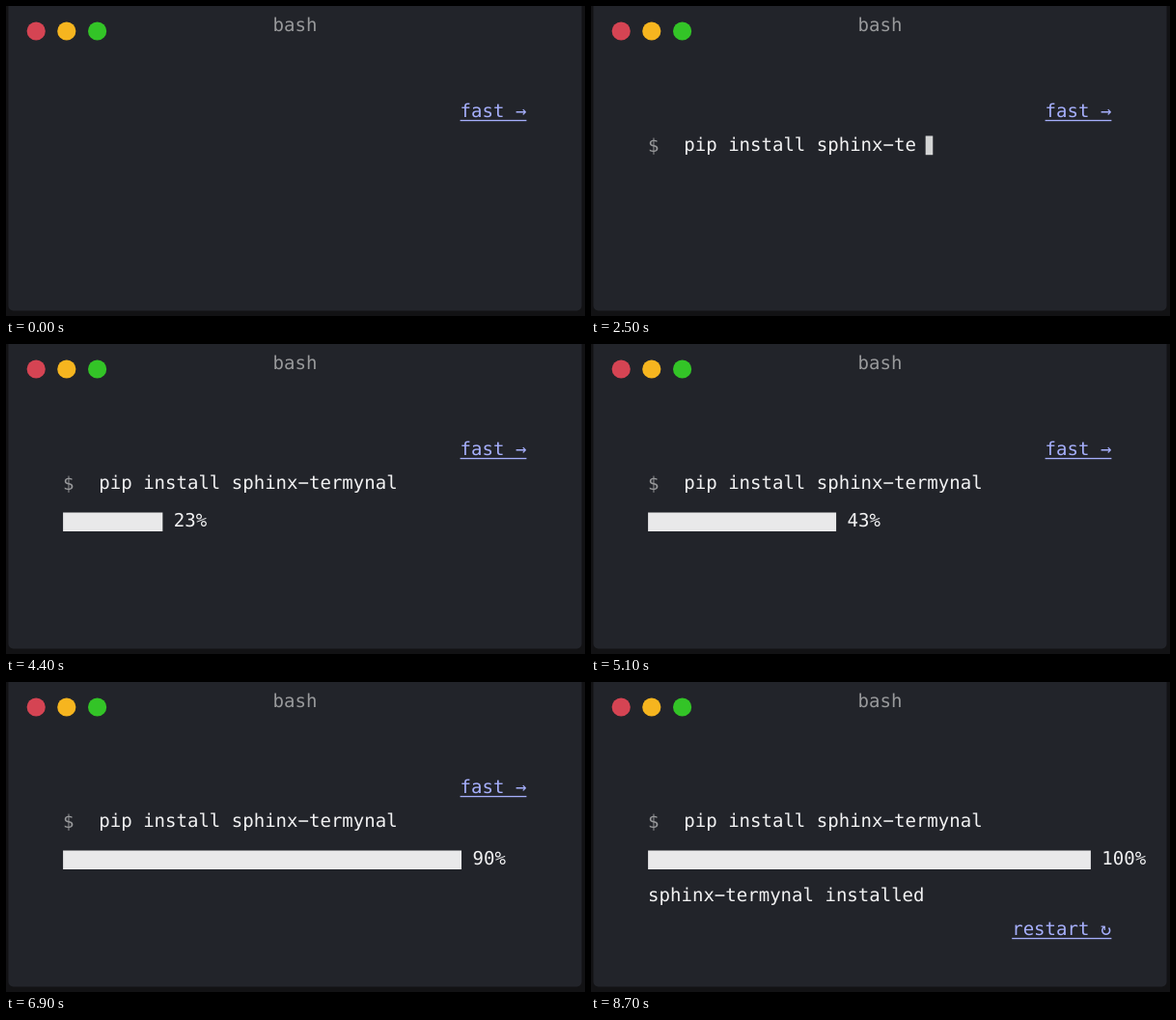
Animation, 600 px wide and 321 px high, one loop 8.8 s. Source, as an HTML page:

```html
<!DOCTYPE html>
<html lang="en">
<head>
<meta charset="utf-8">
<title>Terminal</title>
<style>
  html, body { margin: 0; width: 100%; height: 100%; overflow: hidden; background: #121214; }
  svg { display: block; width: 100%; height: 100%; }
  text {
    font: 19.05px "DejaVu Sans Mono", "Liberation Mono", monospace;
    fill: #f1f1f2;
    white-space: pre;
    text-rendering: geometricPrecision;
  }
  .muted { fill: #98999b; }
  .link text, .link rect { fill: #a6affc; }
</style>
</head>
<body>
<svg viewBox="0 0 600 321">
  <rect width="600" height="321" fill="#121214"/>
  <rect x="2.5" y="-8" width="594" height="323.5" rx="5" fill="#22242a"/>
  <circle cx="31.2" cy="26" r="9.6" fill="#d54453"/>
  <circle cx="62.8" cy="26" r="9.6" fill="#f6b51f"/>
  <circle cx="94.6" cy="26" r="9.6" fill="#33c427"/>
  <text class="muted" x="299.5" y="26" text-anchor="middle">bash</text>

  <g id="fast" class="link">
    <text x="470.6" y="115">fast →</text>
    <rect x="470.6" y="117.9" width="68.8" height="1.3"/>
  </g>
  <g id="prompt">
    <text class="muted" x="59.1" y="151">$</text>
    <text id="command" x="96.3" y="150"></text>
    <rect id="cursor" y="134.5" width="7.6" height="19.7" fill="#eeeeee"/>
  </g>
  <rect id="bar" x="59.1" y="174.5" height="19.5" fill="#e9e9ea"/>
  <text id="percent" y="189"></text>
  <text id="result" x="59.1" y="227">sphinx−termynal installed</text>
  <g id="restart" class="link">
    <text x="436.2" y="262">restart ↻</text>
    <rect x="436.2" y="264.9" width="103.2" height="1.3"/>
  </g>
</svg>
<script>
  const LOOP = 8800, FRAME = 100;
  const CHAR = 11.47, STEP = 92.5, PAUSE = 505;
  const COMMAND = "pip install sphinx−termynal";
  const CELLS = 40;

  const typeStart = 480;
  const barStart = typeStart + COMMAND.length * STEP + PAUSE;
  const resultStart = barStart + CELLS * STEP + PAUSE;
  const restartStart = resultStart + PAUSE;

  const el = id => document.getElementById(id);
  const show = (id, on) => el(id).setAttribute("visibility", on ? "visible" : "hidden");
  const countSince = (t, start, max) =>
    Math.max(0, Math.min(max, Math.floor((t - start) / STEP)));

  // The CSS "ease" curve, cubic-bezier(.25, .1, .25, 1)
  function ease(x) {
    const bezier = (u, a, b) => 3 * u * (1 - u) ** 2 * a + 3 * u * u * (1 - u) * b + u ** 3;
    let low = 0, high = 1;
    for (let i = 0; i < 20; i++) {
      const mid = (low + high) / 2;
      if (bezier(mid, 0.25, 0.25) < x) low = mid; else high = mid;
    }
    return bezier(low, 0.1, 1);
  }

  function blink(ms) {
    const phase = (ms % 1000) / 500;
    return phase < 1 ? 1 - ease(phase) : ease(phase - 1);
  }

  function draw(time) {
    const t = Math.floor((time % LOOP) / FRAME) * FRAME;

    const typed = countSince(t, typeStart, COMMAND.length);
    const typing = t >= typeStart && t < barStart;
    show("prompt", t >= typeStart);
    el("command").textContent = COMMAND.slice(0, typed);
    show("cursor", typing);
    if (typing) {
      el("cursor").setAttribute("x", 96.3 + typed * CHAR + 9.5);
      el("cursor").setAttribute("opacity", blink(t - typeStart + 40));
    }

    const cells = countSince(t, barStart, CELLS);
    el("bar").setAttribute("width", cells * CHAR);
    el("percent").setAttribute("x", 59.1 + (cells + 1) * CHAR);
    el("percent").textContent = cells ? Math.round(cells / CELLS * 100) + "%" : "";

    show("result", t >= resultStart);
    show("restart", t >= restartStart);
    show("fast", t < restartStart);
  }

  const origin = performance.now();
  function tick() {
    draw(performance.now() - origin);
    requestAnimationFrame(tick);
  }
  tick();
</script>
</body>
</html>
```
